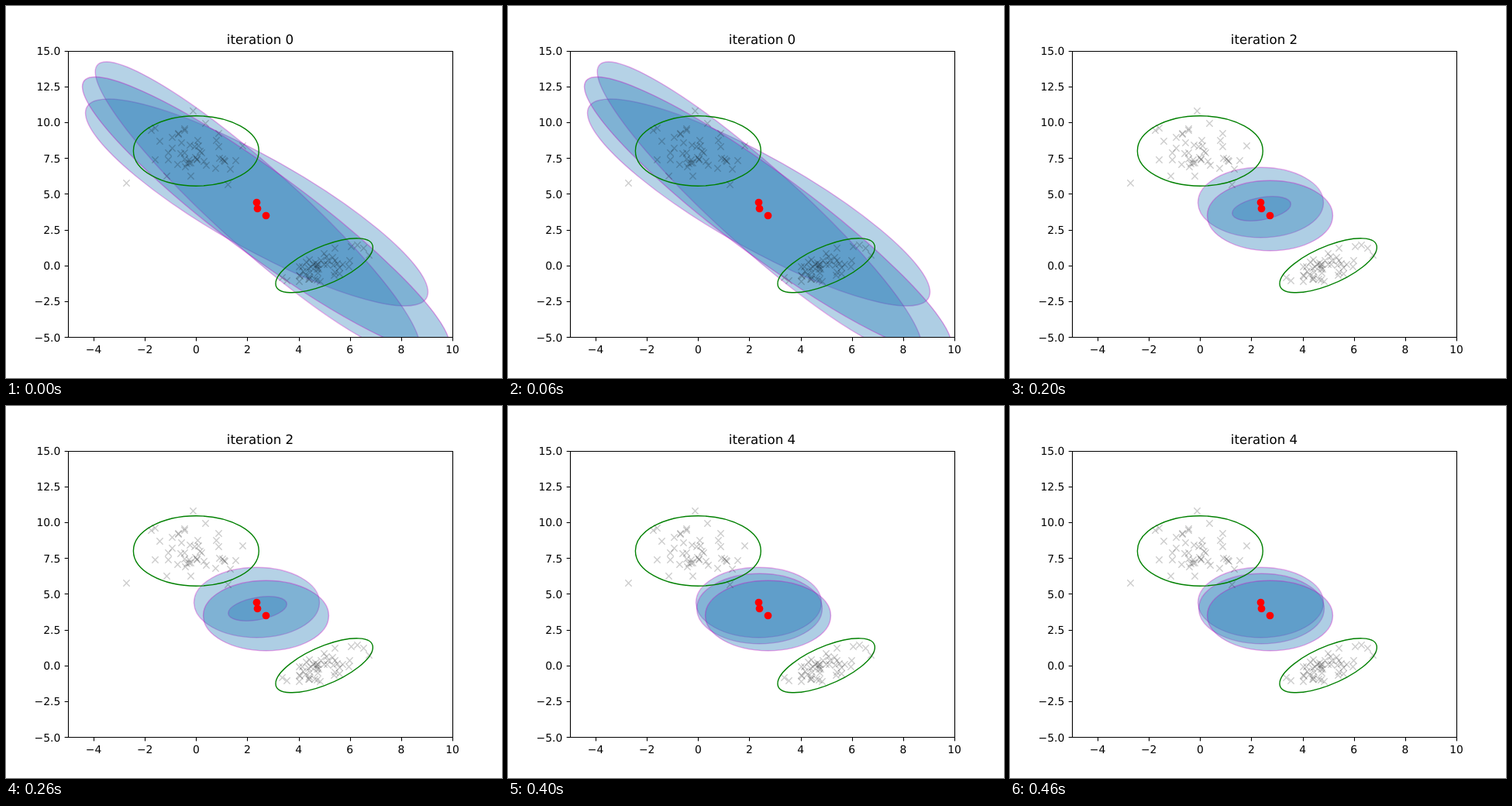
An HTML page for the animation above (500 ms loop, 640 by 480 pixels).

```html
<!DOCTYPE html>
<html lang="en">
<head>
<meta charset="utf-8">
<title>Mixture fit</title>
<style>
  html, body { margin: 0; width: 100%; height: 100%; overflow: hidden; background: #fff; }
  svg { display: block; }
  text { font: 13.89px "DejaVu Sans", sans-serif; text-rendering: geometricPrecision; }
  #title { font-size: 16.67px; text-anchor: middle; }
  .x { text-anchor: middle; }
  .y { text-anchor: end; }
  circle { vector-effect: non-scaling-stroke; stroke-width: 1.39; }
  #fits circle { fill: #1f77b4; stroke: #bf00bf; }
  #truth circle { fill: none; stroke: #008000; }
  #data path { fill: none; stroke: #000; stroke-width: 1.39; stroke-opacity: .2; }
  #means circle { fill: #f00; }
  #axes path { fill: none; stroke: #000; stroke-width: 1.11; }
</style>
</head>
<body>
<svg width="640" height="480" viewBox="0 0 640 480">
  <clipPath id="plot"><rect x="80" y="57.6" width="496" height="369.6"/></clipPath>
  <g clip-path="url(#plot)">
    <g id="fits"></g>
    <g id="truth"></g>
    <g id="data"></g>
    <g id="means"></g>
  </g>
  <g id="axes"><path d="M80.5 58.5H576.5V427.5H80.5Z"/></g>
  <text id="title" x="328" y="49"></text>
</svg>
<script>
const layer = id => document.getElementById(id);
const add = (id, markup) => layer(id).insertAdjacentHTML("beforeend", markup);
const xPixel = x => 80 + (x + 5) * 496 / 15;
const yPixel = y => 57.6 + (15 - y) * 18.48;
const snap = v => Math.round(v) + .5;

// Covariance ellipse from its half extents and correlation, in pixels
const ellipse = ([cx, cy], [hx, hy, rho], alpha = 1) =>
  `<circle r="1" fill-opacity="${alpha}" stroke-opacity="${alpha}" transform="matrix(${
    [hx, -hy * rho, 0, hy * Math.sqrt(1 - rho * rho), cx, cy]})"/>`;

const cross = (x, y) =>
  add("data", `<path d="M${snap(x) - 4.17} ${snap(y) - 4.17}l8.33 8.33m0-8.33l-8.33 8.33"/>`);

let seed = 7;
const random = () => (seed = seed * 16807 % 2147483647) / 2147483647;

// Normal samples around a centre, with a few fixed outliers
function cluster(center, shape, count, outliers) {
  const [hx, hy, rho] = shape;
  add("truth", ellipse(center, shape));
  for (const [x, y] of outliers) cross(x, y);
  for (let i = 0; i < count; i++) {
    const radius = Math.sqrt(-2 * Math.log(1 - .82 * (i + .5) / count)) / 2.4477;
    const angle = 2 * Math.PI * random();
    const u = radius * Math.cos(angle), v = radius * Math.sin(angle);
    cross(center[0] + hx * u, center[1] - hy * (rho * u + Math.sqrt(1 - rho * rho) * v));
  }
}

const round = [80.94, 45.23, 0];
cluster([xPixel(0), yPixel(8)], round, 42,
  [[155, 228], [241, 135], [257, 151], [305, 180], [187, 160], [192, 157], [286, 230], [207, 219]]);
cluster([xPixel(5), yPixel(0)], [62.7, 35, .667], 42,
  [[356, 350], [362, 354], [405, 355], [424, 343], [424, 312], [453, 308], [461, 312], [468, 321]]);

const means = [[323.5, 253.5], [324.5, 261.5], [335.5, 270.5]];
const weights = [.33, .33, .36];
for (const [x, y] of means) add("means", `<circle cx="${x}" cy="${y}" r="4.86"/>`);

for (let x = -4; x <= 10; x += 2) {
  const px = xPixel(x);
  add("axes", `<path d="M${snap(px)} 427.5v4.86"/>
    <text class="x" x="${px}" y="448">${String(x).replace("-", "−")}</text>`);
}
for (let y = -5; y <= 15; y += 2.5) {
  const py = yPixel(y);
  add("axes", `<path d="M80.5 ${snap(py)}h-4.86"/>
    <text class="y" x="70.3" y="${Math.round(py + 5.3)}">${y.toFixed(1).replace("-", "−")}</text>`);
}

// Half extents and correlation of each component; the fit settles to unit covariances
const settled = [round, round, round];
const iterations = [
  [[221, 133.5, -.865], [209.3, 189.5, -.932], [237, 179, -.93]],
  [[223, 177.5, -.91], null, round],
  [round, [37.8, 15.8, .37], round],
  settled,
  settled
];

let shown = -1;
function draw() {
  const step = Math.floor(performance.now() / 100) % iterations.length;
  if (step !== shown) {
    shown = step;
    layer("title").textContent = `iteration ${step}`;
    layer("fits").innerHTML = iterations[step]
      .map((shape, k) => shape ? ellipse(means[k], shape, weights[k]) : "").join("");
  }
  requestAnimationFrame(draw);
}
draw();
</script>
</body>
</html>
```
